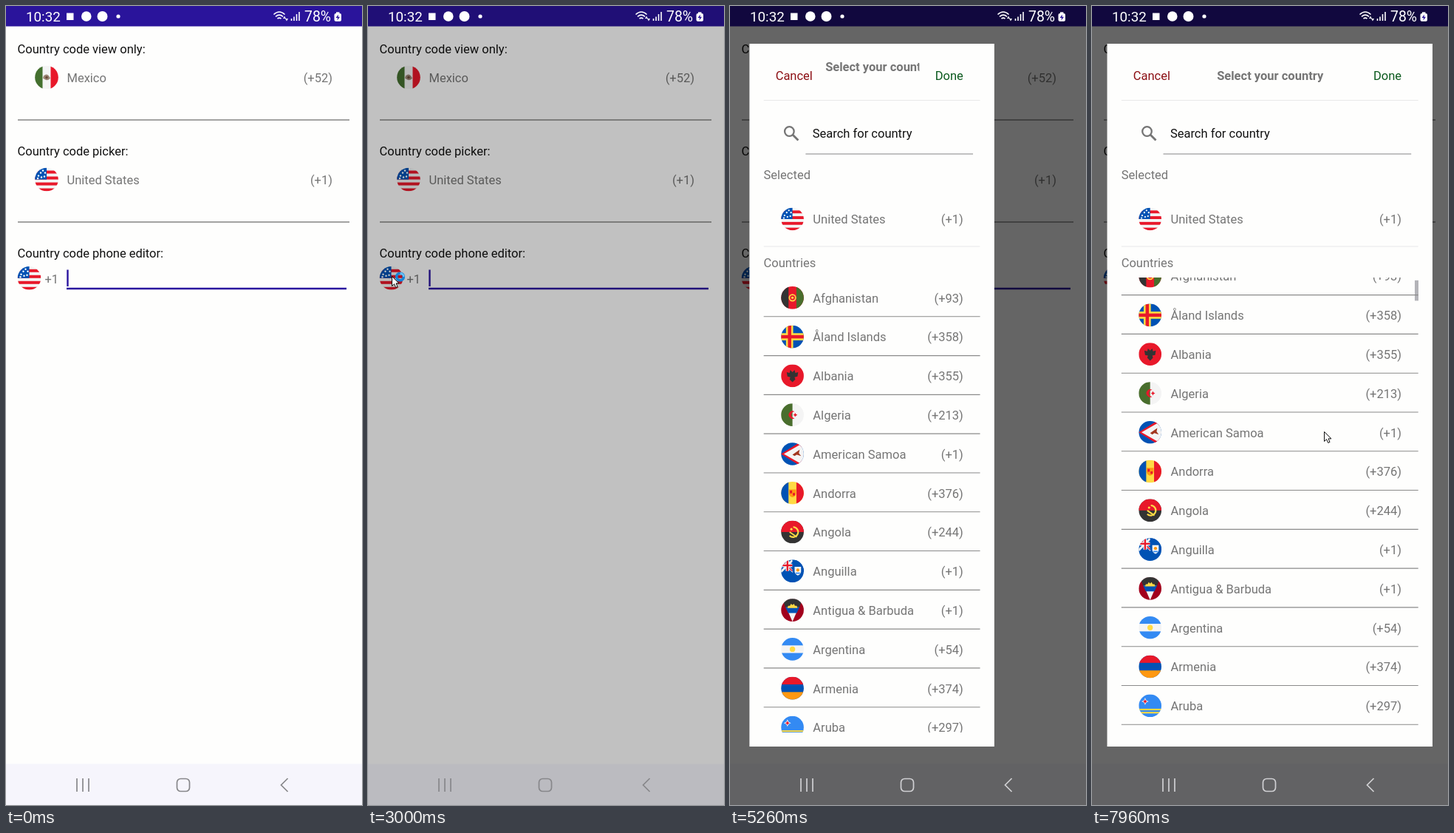
Animation of 482x1080 px, one loop 8 s. Source, as an HTML page:

```html
<!DOCTYPE html>
<html lang="en">
<head>
<meta charset="utf-8">
<title>Country code picker</title>
<style>
html, body { margin: 0; width: 100%; height: 100%; overflow: hidden; background: #fefefd; }
svg { display: block; width: 100%; height: 100%; }
text { font: 16.5px Roboto, sans-serif; fill: #757575; white-space: pre; }
.dark { fill: #111; }
.bold { font-weight: 700; }
.status { fill: #fff; }
</style>
</head>
<body>
<svg id="stage" viewBox="0 0 482 1080" xmlns="http://www.w3.org/2000/svg"></svg>
<script>
const LOOP = 8000, ROW = 52.79;
const RED = '#e8182a', BLUE = '#0052b4', SKY = '#338af3', GOLD = '#ffda44', WHITE = '#f4f4f4', BLACK = '#333', GREEN = '#496e2d';

const rect = (x, y, w, h, fill, more = '') => `<rect x="${x}" y="${y}" width="${w}" height="${h}" fill="${fill}" ${more}/>`;
const disc = (x, y, r, fill) => `<circle cx="${x}" cy="${y}" r="${r}" fill="${fill}"/>`;
const ring = (x, y, r, color, w) => `<circle cx="${x}" cy="${y}" r="${r}" fill="none" stroke="${color}" stroke-width="${w}"/>`;
const shape = (d, fill) => `<path d="${d}" fill="${fill}"/>`;
const stroke = (d, color, w, more = '') => `<path d="${d}" fill="none" stroke="${color}" stroke-width="${w}" ${more}/>`;
const text = (x, y, s, cls = '', more = '') => `<text x="${x}" y="${y}" class="${cls}" ${more}>${s}</text>`;
const END = 'text-anchor="end"';
const full = fill => rect(-16, -16, 32, 32, fill);
const columns = (a, b, c) => full(b) + rect(-16, -16, 10.5, 32, a) + rect(5.5, -16, 10.5, 32, c);
const rows = (a, b, c) => full(b) + rect(-16, -16, 32, 10.7, a) + rect(-16, 5.3, 32, 10.7, c);

const stars = [[-11, -5], [-5, -12], [-3, -4], [-8, -9], [-2, -9], [-7, -3], [-12, -1.5]];
const flags = {
  us: full(WHITE) + [-12, -4, 4, 12].map(y => rect(-16, y, 32, 4, RED)).join('') +
    rect(-16, -16, 16, 16, BLUE) + stars.map(([x, y]) => disc(x, y, 1.2, '#fff')).join(''),
  mx: columns('#44702f', WHITE, RED) + shape('M-4 -2Q0 -6 3 -2L5 1Q2 5 -2 3L-5 1Z', '#9a8574') + disc(0, 0, 1.8, '#6b4a3a'),
  af: columns(BLACK, RED, GREEN) + ring(0, 0, 4.4, GOLD, 1.8) + disc(0, 0, 1.7, GOLD),
  ax: full(BLUE) + rect(-9, -16, 10, 32, GOLD) + rect(-16, -5, 32, 10, GOLD) + rect(-6.3, -16, 4.6, 32, RED) + rect(-16, -2.3, 32, 4.6, RED),
  al: full(RED) + shape('M-3 -8L0 -5L3 -8L4 -4L8 -5L7 1L3 2L4 5L0 9L-4 5L-3 2L-7 1L-8 -5L-4 -4Z', BLACK),
  dz: full(WHITE) + rect(-16, -16, 16, 32, GREEN) + shape('M3 -4.6A5.4 5.4 0 1 0 3 4.6A4.3 4.3 0 1 1 3 -4.6Z', RED) +
    shape('M1 0L3 -1L3.5 -3L5 -1L7 0L5 1L3.5 3L3 1Z', RED),
  as: full(BLUE) + shape('M-16 0L13 -18V18Z', RED) + shape('M-12 0L16 -16V16Z', WHITE) + shape('M0 1L10 -6L9 -1L12 3L6 1L3 3Z', '#a2361f'),
  ad: columns(BLUE, GOLD, RED) + shape('M-5 -5H5V1Q4 5 0 6Q-4 5 -5 1Z', '#ff9811') + rect(-3.5, -3.5, 3, 4, RED) + rect(.5, 0, 3, 3.5, RED),
  ao: full(BLACK) + rect(-16, -16, 32, 16, RED) + stroke('M1 -7A7 7 0 1 1 -4 5', GOLD, 2.2) + stroke('M-4 0L6 7', GOLD, 2) + disc(-1.5, -4, 1.6, GOLD),
  ai: full(BLUE) + stroke('M-16 -16L1 1M-16 1L0 -15', WHITE, 3) + stroke('M-15 -15L0 0', RED, 1.5) +
    stroke('M-16 -8H0M-7 -16V0', WHITE, 5) + stroke('M-16 -8H0M-7 -16V0', RED, 2.4) + rect(0, -16, 16, 17, BLUE) +
    shape('M3 -6H12V1Q11 5 7.5 6Q4 5 3 1Z', WHITE) + disc(7.5, -1.5, 2.2, '#ff9811') + rect(4.5, 2, 6, 1.8, SKY),
  ag: full('#a2001d') + shape('M-14 -16H14L0 16Z', WHITE) + shape('M-14 -16H14L9.8 -4H-9.8Z', BLACK) +
    shape('M-9.8 -4H9.8L6 4H-6Z', BLUE) + shape('M-7 -3L-6 -6L-3.5 -6L-2 -9L0 -7L2 -9L3.5 -6L6 -6L7 -3Z', GOLD),
  ar: rows(SKY, WHITE, SKY) + disc(0, 0, 3.8, GOLD),
  am: rows(RED, BLUE, '#ff9811'),
  aw: full(SKY) + rect(-16, 4.2, 32, 2.2, GOLD) + rect(-16, 8.6, 32, 2.2, GOLD) +
    shape('M-7 -11L-5.4 -7.6L-2 -6L-5.4 -4.4L-7 -1L-8.6 -4.4L-12 -6L-8.6 -7.6Z', WHITE) + shape('M-7 -9L-6 -7L-4 -6L-6 -5L-7 -3L-8 -5L-10 -6L-8 -7Z', RED)
};
const flag = (id, x, y, s = 1) => `<use href="#${id}" transform="translate(${x} ${y}) scale(${s})"/>`;

const countries = [
  ['af', 'Afghanistan', 93], ['ax', 'Åland Islands', 358], ['al', 'Albania', 355], ['dz', 'Algeria', 213],
  ['as', 'American Samoa', 1], ['ad', 'Andorra', 376], ['ao', 'Angola', 244], ['ai', 'Anguilla', 1],
  ['ag', 'Antigua &amp; Barbuda', 1], ['ar', 'Argentina', 54], ['am', 'Armenia', 374], ['aw', 'Aruba', 297]
];

const entry = (id, name, code, y, w) =>
  flag(id, 58.2, y - .4, .97) + text(86, y + 6, name) + text(w - 42, y + 6, `(+${code})`, '', END);

// Dialog of width w, with x measured from its left edge
function dialog(id, w, title) {
  const line = (y, color, a = 19.3, b = w - 19.3) => stroke(`M${a} ${y}H${b}`, color, 1.1);
  const list = countries.map(([f, name, code], i) =>
    entry(f, name, code, 394.7 + i * ROW, w) + line(419.8 + i * ROW, '#8a8a8a')).join('');
  return `<g id="${id}">
    <clipPath id="${id}Clip">${rect(0, 367, w, 615, '#000')}</clipPath>
    ${rect(0, 51, w, 950, '#fefefd')}
    ${text(35.3, 100, 'Cancel', '', 'style="fill:#8c0f14"')}
    ${title}
    ${text(w - 42, 100, 'Done', '', `style="fill:#0b5a1e" ${END}`)}
    ${line(127.5, '#e9e9e9')}
    ${ring(54, 169.5, 6.3, '#757575', 2.3)}${stroke('M58.5 174L66 181.5', '#757575', 2.8)}
    ${text(85.4, 178, 'Search for country', 'dark')}
    ${line(200, '#858585', 76, w - 28.8)}
    ${text(19.2, 234, 'Selected')}
    ${entry('us', 'United States', 1, 288.4, w)}
    ${line(325, '#e9e9e9')}
    ${text(19.2, 353, 'Countries')}
    <g clip-path="url(#${id}Clip)"><g class="list">${list}</g></g>
  </g>`;
}

const field = (label, y, id, name, code) =>
  text(15.5, y + 6, label, 'dark') + flag(id, 55, y + 38.5) + text(82.5, y + 44.7, name) +
  text(442, y + 44.7, code, '', END) + stroke(`M16 ${y + 96}H465`, '#858585', 1.4);

const stage = document.getElementById('stage');
stage.innerHTML = `
  <defs>
    <clipPath id="round"><circle r="15.8"/></clipPath>
    <clipPath id="titleClip">${rect(100, 60, 130, 50, '#000')}</clipPath>
    ${Object.entries(flags).map(([id, art]) => `<g id="${id}" clip-path="url(#round)">${art}</g>`).join('')}
  </defs>
  ${rect(0, 0, 482, 1080, '#fefefd')}
  ${rect(0, 0, 482, 27.5, '#2a149b')}
  ${rect(0, 1024.5, 482, 56, '#f6f5fc')}
  ${field('Country code view only:', 58, 'mx', 'Mexico', '(+52)')}
  ${field('Country code picker:', 196, 'us', 'United States', '(+1)')}
  ${text(15.5, 340, 'Country code phone editor:', 'dark')}
  ${flag('us', 31.5, 367.8)}${text(52.5, 374.7, '+1')}
  ${stroke('M82 382H461', '#2a149f', 2.4)}${stroke('M83.5 356.5V379', '#2a149f', 2.4)}
  <rect id="dim" width="482" height="1080"/>
  <g>
    ${text(27, 20.8, '10:32', 'status', 'style="font-size:18.8px"')}
    ${rect(82, 9.5, 9.5, 9.5, '#fff')}${disc(108.8, 14, 6.8, '#fff')}${disc(130.5, 14, 7, '#fff')}${disc(152, 14, 2.6, '#fff')}
    ${stroke('M362.5 11.5Q370 4.500 377.500 11.5M365 14.300Q370 10 375 14.300M367.500 17.200Q370 15 372.500 17.200', '#fff', 1.6)}
    ${shape('M375 17L377 13.500L379 17ZM378 17L380 20.500L382 17Z', '#fff')}
    ${stroke('M386.500 17V20M390 14.500V20M393.500 11V20M397 8V20', '#fff', 1.6)}
    ${text(404, 20.8, '78%', 'status', 'style="font-size:19.400px"')}
    ${rect(444.5, 10, 9.5, 10.8, '#fff', 'rx="2"')}${rect(447, 8.3, 4.5, 2, '#fff')}${shape('M450 11.500L446.500 16H449L448.500 19.500L452 14.800H449.600Z', '#2a149b')}
  </g>
  <g id="nav" fill="none" stroke-width="1.7">
    <path d="M96 1044V1062M104 1044V1062M112 1044V1062M381.500 1044L372.500 1053L381.500 1062"/>
    <rect x="231.500" y="1044.500" width="17" height="17" rx="5"/>
  </g>
  ${dialog('narrow', 331.5, `<g clip-path="url(#titleClip)">${text(102.8, 88, 'Select your country', 'bold')}</g>`)}
  ${dialog('wide', 440.5, text(220.7, 100, 'Select your country', 'bold', 'text-anchor="middle"') +
    rect(416.5, 367, 5, 30.5, '#b3b3b8', 'id="thumb"'))}
  <g id="pointer">
    <g id="busy">${ring(11.5, 1, 4.8, '#1583d8', 3.6)}${stroke('M11.500 -3.800A4.800 4.800 0 0 1 16.300 1', '#6cc3f5', 2.4)}</g>
    <path d="M.5 .5V13.500L3.600 10.700L5.700 15.500L8 14.500L6 9.900H10Z" fill="#fff" stroke="#111" stroke-width="1"/>
  </g>`;

const $ = id => document.getElementById(id);
const [dim, nav, narrow, wide, pointer, busy, thumb] = ['dim', 'nav', 'narrow', 'wide', 'pointer', 'busy', 'thumb'].map($);
const list = wide.querySelector('.list');

const part = (t, a, b) => Math.min(1, Math.max(0, (t - a) / (b - a)));
const mix = (a, b, p) => a + (b - a) * p;
const smooth = p => p * p * (3 - 2 * p);
const out = (p, n) => 1 - (1 - p) ** n;
const show = (el, on) => el.setAttribute('visibility', on ? 'visible' : 'hidden');
const move = (el, x, y) => el.setAttribute('transform', `translate(${x.toFixed(2)} ${y.toFixed(2)})`);

// Pointer stops: time, x, y
const visits = [
  [[400, 432, 613], [1130, 32, 365], [4100, 32, 365], [4260, 21, 377], [4460, -11, 349]],
  [[5830, 22, 755], [6700, 362, 462], [6830, 362, 462], [7400, 314, 604], [7960, 314, 575], [8000, 314, 572]]
];

function place(t) {
  const stops = visits.find(v => t >= v[0][0] && t < v[v.length - 1][0]);
  if (!stops) return null;
  const i = stops.findIndex(s => s[0] > t);
  const [t0, x0, y0] = stops[i - 1], [t1, x1, y1] = stops[i];
  const p = smooth(part(t, t0, t1));
  return [mix(x0, x1, p), mix(y0, y1, p)];
}

function draw(t) {
  const fade = out(part(t, 2930, 3460), 3.5);
  dim.setAttribute('opacity', .6 * fade);
  const light = Math.round(mix(135, 208, part(t, 3040, 3300)));
  nav.setAttribute('stroke', `rgb(${light},${light},${light + 3})`);

  const x = 20.5 + 55 * (1 - out(part(t, 5160, 5352), 3));
  show(narrow, t >= 5160 && t < 5300);
  show(wide, t >= 5300);
  narrow.setAttribute('opacity', part(t, 5130, 5220));
  move(narrow, x, 0);
  move(wide, x, 0);

  const scroll = 29.2 * smooth(part(t, 7400, 7960));
  move(list, 0, -scroll);
  thumb.setAttribute('opacity', part(t, 6450, 6600));
  thumb.setAttribute('y', 367 + scroll * .13);
  thumb.setAttribute('height', 30.5 - scroll * .1);

  const at = place(t);
  pointer.setAttribute('display', at ? 'inline' : 'none');
  if (at) move(pointer, ...at);
  busy.setAttribute('display', t >= 2130 && t < 3300 ? 'inline' : 'none');
}

function tick() {
  draw(performance.now() % LOOP);
  requestAnimationFrame(tick);
}
tick();
</script>
</body>
</html>
```
